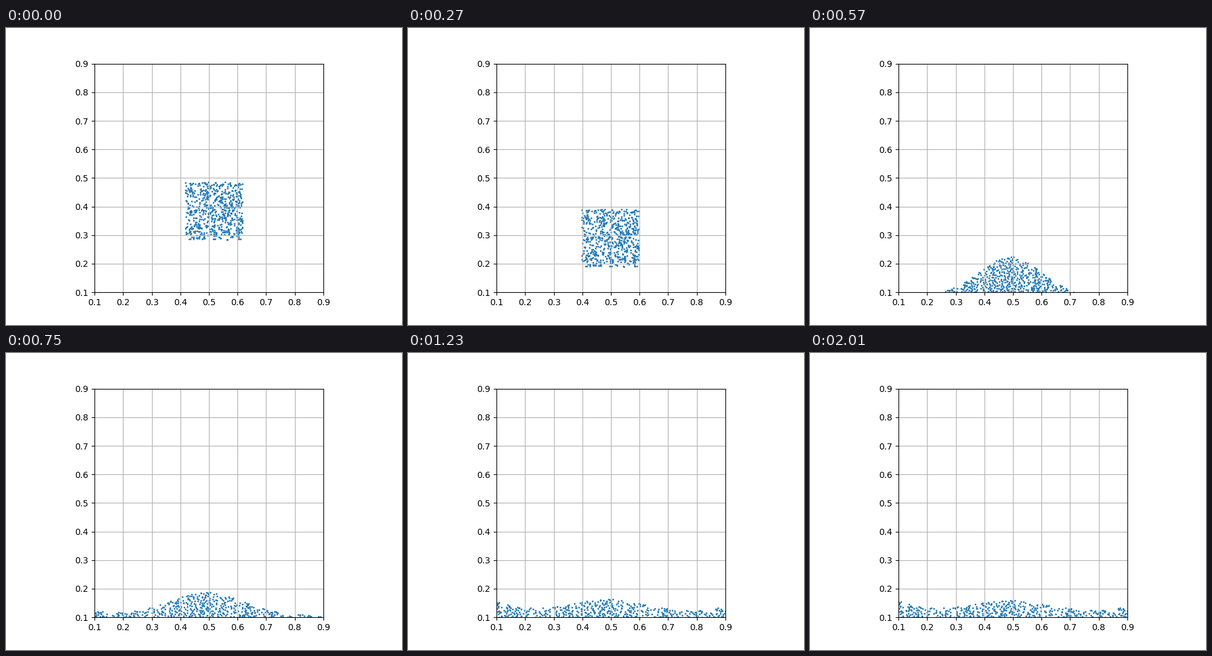
Write a matplotlib script that moves like this. It is 640 by 480 pixels and loops after 2100 ms.

```python
import numpy as np
import matplotlib.pyplot as plt
from matplotlib.animation import FuncAnimation

FRAMES, INTERVAL, LAST = 70, 30, 67
COUNT, BIN = 640, 32
LO, HI = 0.0875, 0.9125      # solid floor and walls, just outside the view
MID = 0.49                   # crest of the heap
IMPACT, SPREAD = 14, 18      # block lands, heap starts to flow

rng = np.random.default_rng(4)
u, v = rng.random((2, COUNT))

# Low outer grains run furthest; each slice of grains keeps its stacking order
order = np.argsort((u - 0.5) * (1.5 - v))
rank = np.empty(COUNT)
rank[order] = np.sort(rng.random(COUNT))
level = np.empty(COUNT)
stack = v[order].reshape(-1, BIN).argsort(axis=1).argsort(axis=1)
level[order] = ((stack.ravel() + rng.random(COUNT)) / BIN) ** 1.2


def ease(t):
    t = np.clip(t, 0, 1)
    return t * t * (3 - 2 * t)


def fall(n):
    """Free fall of the block, its foot flaring as it meets the floor."""
    shift = -0.0022 * n
    y = 0.285 + 0.2 * v - 0.00448 * n - 0.000675 * n * n
    flare = 0.24 * np.clip((n - 12) / 2, 0, 1) ** 2
    stretch = 1 + flare * np.exp(-(y - 0.09) / 0.07)
    return np.column_stack([0.518 + shift + 0.2 * (u - 0.5) * stretch, y])


def depth(x, n):
    """Sand depth: a sinking mound, a running front and a bank at each wall."""
    t = n - SPREAD
    left = np.exp(-t / 7.5)
    width = 0.19 - 0.05 * left ** 2
    mound = (0.042 + 0.104 * left) * np.exp(-((x - MID) / width) ** 2)
    bed = 0.03 * (1 - left)
    front = np.clip((0.26 + 0.037 * t - abs(x - MID)) / 0.06, 0, 1)
    banks = (0.046 * ease((t - 1) / 13) * np.exp((LO - x) / 0.09)
             + 0.030 * ease((t - 4) / 11) * np.exp((x - HI) / 0.06))
    return (mound + bed) * front + banks


def pile(n):
    """Spread the grains evenly under the surface."""
    grid = np.linspace(LO, HI, 400)
    d = depth(grid, n)
    mass = np.cumsum(d + 1e-6)
    x = np.interp(rank, (mass - mass[0]) / (mass[-1] - mass[0]), grid)
    return np.column_stack([x, LO + level * depth(x, n)])


def grains(n):
    if n <= IMPACT:
        return fall(n)
    if n >= SPREAD:
        return pile(n)
    s = (n - IMPACT) / (SPREAD - IMPACT)
    return (1 - s) * fall(IMPACT) + s * pile(SPREAD)


fig, ax = plt.subplots(figsize=(6.4, 4.8), dpi=100)
ax.set_aspect("equal")
ax.set(xlim=(0.1, 0.9), ylim=(0.1, 0.9))
ax.grid(True)
dots = ax.scatter(*grains(0).T, s=1)


def update(n):
    dots.set_offsets(grains(min(n, LAST)))
    return dots,


anim = FuncAnimation(fig, update, frames=FRAMES, interval=INTERVAL, repeat=True, repeat_delay=0)
plt.show()
```
